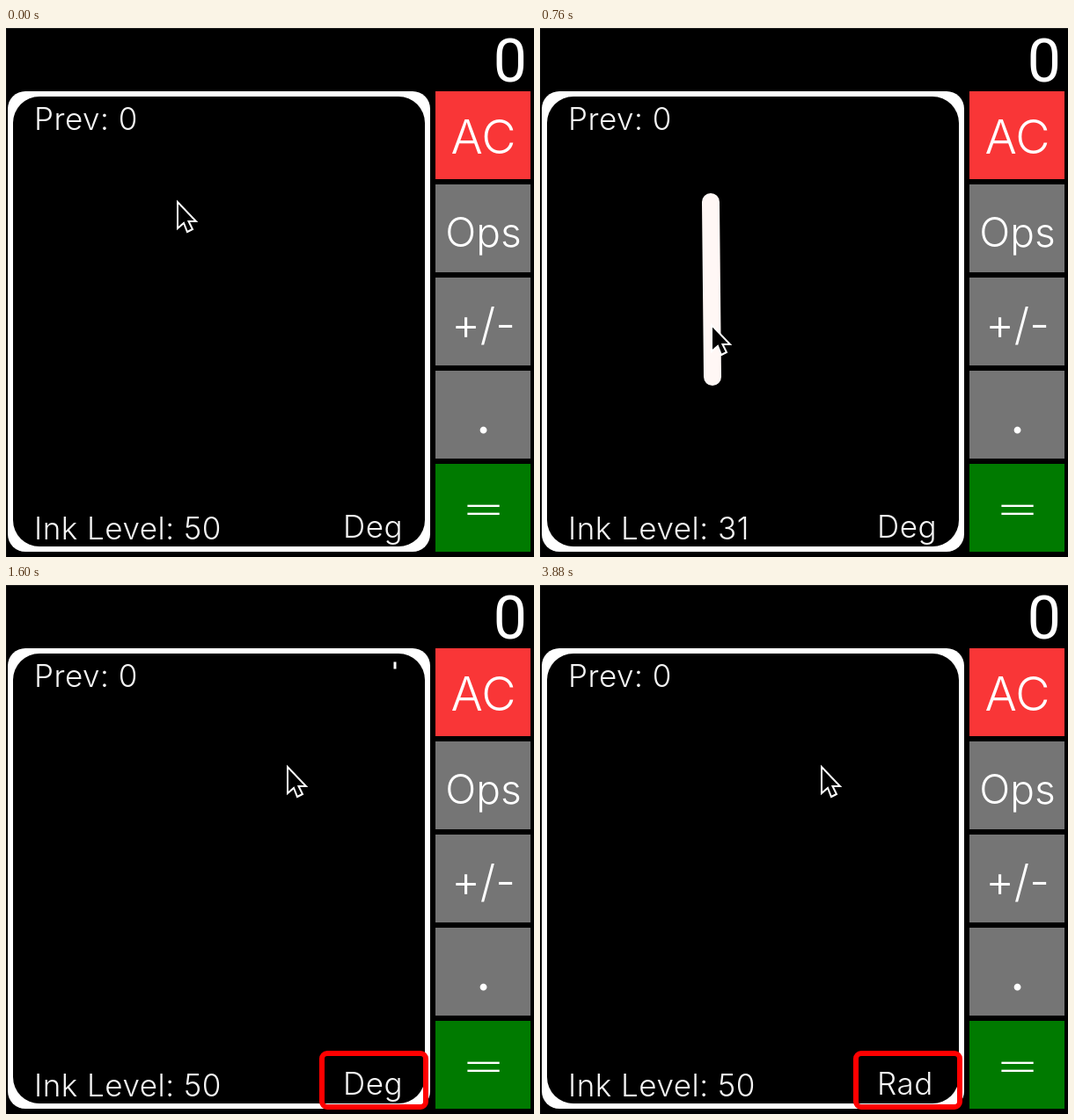
Recreate the animation shown at these times as an HTML page. Size 600 by 602 pixels, loop 3.92 s.

```html
<!DOCTYPE html>
<html lang="en">
<head>
<meta charset="utf-8">
<title>Handwriting calculator</title>
<style>
  html, body { margin: 0; width: 100%; height: 100%; overflow: hidden; background: #000; }
  svg { display: block; width: 600px; height: 602px; }
  text { font: 350 35px Inter, sans-serif; letter-spacing: .5px; fill: #f4f4f4; }
  .key { text-anchor: middle; letter-spacing: 0; fill: #fff; }
  .display { font: 400 68px Roboto, sans-serif; font-stretch: 75%; text-anchor: end; letter-spacing: 0; fill: #fff; }
</style>
</head>
<body>
<svg viewBox="0 0 600 602">
  <path d="M0 602V.5H600" fill="none" stroke="#1c1c1c"/>
  <text class="display" x="592" y="61">0</text>
  <rect x="2" y="72" width="480" height="524" rx="20" fill="#fff"/>
  <rect x="8" y="78" width="468" height="512" rx="30"/>
  <g id="keys"></g>
  <text x="32" y="116">Prev: 0</text>
  <text id="ink" x="32" y="582"></text>
  <text id="mode" x="383" y="580"></text>
  <polyline id="stroke" fill="none" stroke="#fff7f5" stroke-width="20" stroke-linecap="round" stroke-linejoin="round"/>
  <g id="spinner" stroke="#fff" stroke-width="3"></g>
  <rect id="highlight" x="359" y="533" width="118" height="61" rx="6" fill="none" stroke="#f00" stroke-width="6"/>
  <path id="cursor" d="M0 0V30L7 24L11 34L17 31L12.5 22H21Z" stroke="#fff" stroke-width="2"/>
</svg>
<script>
const LOOP = 3920, STEP = 40, LAG = 100;
const PEN_DOWN = 428, PEN_UP = 1200, CLEAR = 1400;
const SPIN_START = 1600, SPIN_END = 2720, TICK = 80;
const $ = id => document.getElementById(id);

// Key points of the hand: time, x, y
const hand = [[328, 195, 198], [537, 197, 397], [660, 197, 397], [760, 195, 338],
  [840, 209, 252], [900, 235, 222], [1000, 270, 203], [1100, 320, 207]];

function handAt(t) {
  const i = hand.findIndex(k => k[0] > t);
  const [t0, x0, y0] = hand[i < 0 ? hand.length - 1 : Math.max(0, i - 1)];
  if (i <= 0) return [x0, y0];
  const [t1, x1, y1] = hand[i], p = (t - t0) / (t1 - t0);
  return [x0 + (x1 - x0) * p, y0 + (y1 - y0) * p];
}

// The ink follows the hand with a short delay
function trail(t) {
  const points = [];
  for (let s = PEN_DOWN; s <= t; s += 4) {
    const [x, y] = handAt(s - LAG);
    points.push([x - 1, y]);
  }
  return points.join(" ");
}

function inkLeft(t) {
  const drawn = Math.max(0, Math.min(t, PEN_UP) - PEN_DOWN);
  return 50 - Math.round(26.4 * (drawn / 572) ** 0.64);
}

$("keys").innerHTML = [
  ["AC", "#f93637", 54, "Inter"],
  ["Ops", "#757575", 46, "Inter"],
  ["+/-", "#757575", 50, "Inter"],
  [".", "#757575", 84, "Lato"],
  ["=", "#007a00", 58, "DejaVu Sans"],
].map(([label, fill, size, font], i) => `<g transform="translate(488 ${72 + i * 106})">
    <rect width="108" height="100" fill="${fill}"/>
    <text class="key" x="54.5" y="71" style="font-size:${size}px;font-family:${font},sans-serif">${label}</text>
  </g>`).join("");

$("spinner").innerHTML = Array.from({ length: 12 }, (_, i) =>
  `<path d="M442 87.5v8" transform="rotate(${i * 30} 442 105.5)"/>`).join("");
const ticks = [...$("spinner").children];

function drawSpinner(t) {
  const head = Math.floor((t - SPIN_START) / TICK);
  ticks.forEach((tick, i) => {
    const age = (head - i) % 12;
    const lit = t < SPIN_END && head >= i;
    tick.setAttribute("opacity", lit ? Math.min(1, 0.25 + (11 - age) * 0.15) : 0);
  });
}

function draw(t) {
  const drawing = t < CLEAR;
  $("stroke").setAttribute("points", drawing ? trail(Math.min(t, PEN_UP)) : "");
  $("cursor").setAttribute("transform", `translate(${handAt(t)})`);
  $("ink").textContent = "Ink Level: " + (drawing ? inkLeft(t) : 50);
  $("mode").textContent = t < SPIN_END ? "Deg" : "Rad";
  $("highlight").setAttribute("visibility", drawing ? "hidden" : "visible");
  drawSpinner(t);
}

const start = performance.now();
function loop() {
  const t = (performance.now() - start) % LOOP;
  draw(Math.floor(t / STEP) * STEP);
  requestAnimationFrame(loop);
}
loop();
</script>
</body>
</html>
```
